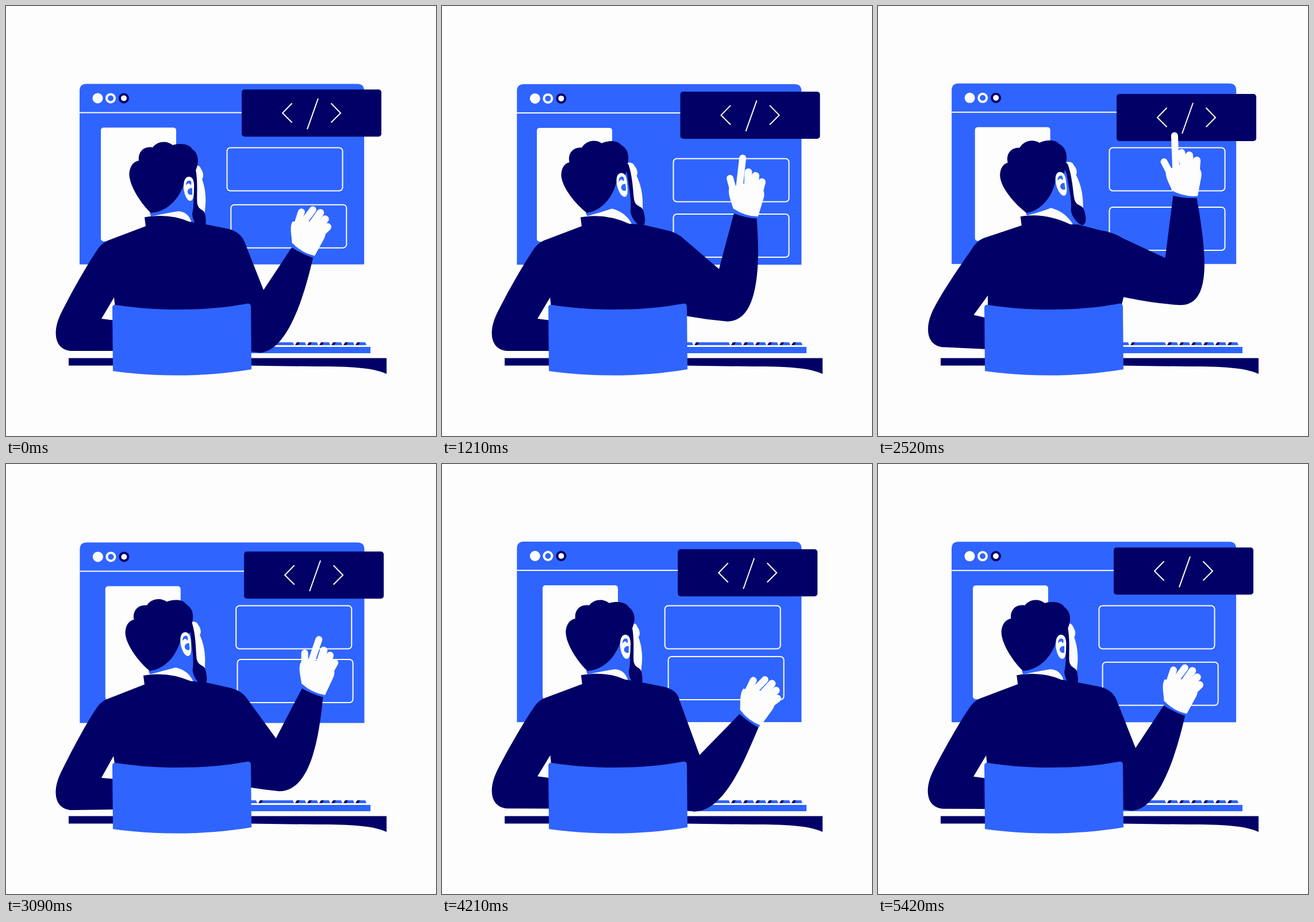
Write an HTML page that moves like this. It is 748 by 748 pixels and loops after 5.45 s.

```html
<!DOCTYPE html>
<html lang="en">
<head>
<meta charset="utf-8">
<title>Developer at work</title>
<style>
html, body { margin: 0; width: 100%; height: 100%; overflow: hidden; background: #fdfdfd; }
svg { display: block; width: 100vw; height: 100vh; }
.b { fill: #2f64ff; }
.d { fill: #000066; }
.w { fill: #fdfdfd; }
.line { fill: none; stroke: #fdfdfd; stroke-width: 2; }
.finger { stroke: #fdfdfd; stroke-linecap: round; }
</style>
</head>
<body>
<svg viewBox="0 0 748 748">
  <g id="win">
    <path class="b" d="M128 449V147Q128 135 140 135H611Q623 135 623 147V449Z"/>
    <path class="line" d="M128 185H623"/>
    <circle class="w" cx="159.5" cy="160" r="9"/>
    <circle class="w" cx="182" cy="160" r="9"/><circle class="b" cx="182" cy="160" r="5"/>
    <circle class="d" cx="205" cy="160" r="9"/><circle class="w" cx="205" cy="160" r="5"/>
  </g>
  <rect id="card" class="w" width="131" height="198" rx="5"/>
  <rect id="box1" class="line" width="201" height="75" rx="6"/>
  <rect id="box2" class="line" width="201" height="75" rx="6"/>
  <g id="badge">
    <rect class="d" width="243" height="82" rx="5"/>
    <path class="line" d="M87.5 24L71 41L87.5 57.5M133 15.5L114 69M155.5 24L172 41L155.5 57.5"/>
  </g>

  <path class="b" d="M400 593H634V604H400Z"/>
  <g id="keys"></g>
  <path class="d" d="M109 612.5H662V640C638 629 600 627 540 627L420 625.5H109Z"/>

  <g id="head">
    <path class="b" d="M250 360L300 330L312 296H330L334 392H262Z"/>
    <g id="face">
      <path class="w" d="M324 277C334 276 338 279 339 283C344 290 344 298 341 301C346 315 348 330 347 345L345 366L332 356Z"/>
      <path class="d" d="M318 270L329 280C335 305 331 335 333 345C336 357 346 352 347 366C349 380 347 388 341 389C334 388 324 374 324 361C328 345 326 325 325 297Z"/>
    </g>
    <path class="d" d="M252 360C236 345 213 312 214.5 290C216 277 223 270 231 269C229 254 240 243 255 246C264 234 281 234 290 242C304 238 319 240 324 249C336 257 336 273 330 286L326 300L310 308C303 332 283 358 252 360Z"/>
    <path class="w" d="M318 297C326 297 328 307 327 318C327 330 326 338 321 339C314 339 309 325 309 313C309 304 312 297 318 297Z"/>
    <path class="b" d="M313 312C313 305 317 302 321 304C323 306 323 310 321 312C319 307 316 308 313 312ZM324 317V328C319 330 315 326 316 321C318 317 321 316 324 317Z"/>
  </g>
  <path id="collar" class="w"/>
  <path id="cuff" class="b"/>
  <path id="suit" class="d"/>
  <g id="hand">
    <path class="w" d="M-23 -9C-28 -20 -38 -33 -36 -44L-29 -46L-18 -55L18 -55Q27 -48 26 -37L22 -3Q0 1 -23 -9Z"/>
    <g id="fingers"></g>
  </g>
  <path class="b" d="M185 525Q185 519 191 520C260 531 350 531 418 518Q426 516 426 524L427 632C350 645 265 646 186 635Z"/>
</svg>
<script>
const LOOP = 5450;
const $ = id => document.getElementById(id);

// Arm joints: at rest, while pointing, and the shift when reaching out
const arm = {
  shoulder: [[416, 413], [430, 403], [-4, -4]],
  crook: [[448, 494], [511, 426], [0, 15]],
  wristL: [[497, 420], [517, 310], [25, 18]],
  wristR: [[534, 438], [559, 311], [20, 25]],
  outer: [[520, 500], [584, 420], [5, 25]],
  elbow: [[490, 603], [600, 502], [0, 2]],
  low: [[440, 603], [545, 502], [-2, 2]],
  pit: [[415, 602], [430, 485], [0, 0]]
};

// Fingers: base, relaxed tip, pointing tip, width
const fingers = [
  [[-26, -35], [-28, -65], [-41, -58], 12],
  [[-19, -46], [-11, -76], [-26, -106], 12],
  [[-4, -46], [3, -76], [-12, -76], 13],
  [[7, -44], [15, -69], [2, -73], 13],
  [[16, -40], [24, -58], [16, -65], 13]
];
$('fingers').innerHTML = fingers.map(([base, , , w]) =>
  `<line class="finger" x1="${base[0]}" y1="${base[1]}" stroke-width="${w}"/>`).join('');
const lines = [...$('fingers').children];

const key = (x, w) =>
  `<path class="b" d="M${x} 590L${x + 3} 585H${x + w - 2}L${x + w} 590Z"/>` +
  `<path class="d" d="M${x} 590L${x + 3} 585H${x + 8}L${x + 5} 590Z"/>`;
$('keys').innerHTML = key(418, 19) + key(439, 62) +
  [0, 1, 2, 3, 4, 5].map(i => key(503 + 21 * i, 19)).join('');

const mix = (a, b, u) => a + (b - a) * u;
function ease(t, from, to) {
  const u = Math.min(1, Math.max(0, (t - from) / (to - from)));
  return u * u * (3 - 2 * u);
}
// Eases from 0 to 1 and later back to 0, across the end of the loop too
function pulse(t, rise, top, fall, end) {
  const s = rise + ((t - rise) % LOOP + LOOP) % LOOP;
  return s < fall ? ease(s, rise, top) : 1 - ease(s, fall, end);
}

const move = (id, value) => $(id).setAttribute('transform', value);
const place = (id, x, y) => move(id, `translate(${x} ${y})`);
const shape = (id, d) => $(id).setAttribute('d', d);

function draw(t) {
  const angle = 4 * Math.PI * t / LOOP, sway = Math.sin(angle);
  const bob = .4 + 1.4 * sway;
  place('win', 1.2 - 1.2 * Math.cos(angle), bob);
  place('card', 165 + 10 * pulse(t, 1700, 3700, 4400, LOOP), 211 + bob);
  place('box1', 384.5 + 18 * pulse(t, 0, 700, 2600, 4800), 246.5 + 19 * pulse(t, 0, 670, 1700, 2520));
  place('box2', 384.5 + 18 * pulse(t, -500, 700, 3760, 4670), 335 + 27 * pulse(t, -600, 800, 1500, 3700));
  place('badge', 410 + 5 * pulse(t, 0, 1500, 2600, 4400), 145.3 + 7.7 * pulse(t, 0, 2520, 2520, LOOP));

  const lift = pulse(t, 670, 1700, 2060, 3760);
  const reach = pulse(t, 2520, 3760, 3760, LOOP);
  const aim = Math.sin(lift * Math.PI / 2);
  const lean = 12 * lift ** 4 - 3 * sway;
  const turn = 22 * (1 - lift) + 9 * reach;

  move('head', `translate(${lean} 0) rotate(${-8 * aim} 252 360)`);
  place('face', 5 * aim, 5 * aim);

  const a = {};
  for (const joint in arm) {
    const [rest, point, out] = arm[joint];
    a[joint] = [0, 1].map(i => mix(rest[i], point[i], lift) + out[i] * reach);
  }

  // Parts of the back follow the lean by different amounts
  const follow = (kx, ky) => (x, y) => [x + kx * lean, y - ky * lean];
  const neck = follow(1, .2), left = follow(.9, .6), rest = follow(.06, .95), gap = follow(.45, .5);
  const tip = [322 + 10 * aim + lean, 374 + 5 * aim];

  shape('collar', `M${neck(243, 368)}Q${[275 + lean, 361 - 2 * aim]} ${[300 + lean - 6 * aim, 357 - 6 * aim]}
    Q${[316 + lean + 3 * aim, 358]} ${tip}L${tip[0]} 392L${neck(250, 385)}Z`);

  const mid = [0, 1].map(i => (a.wristL[i] + a.wristR[i]) / 2);
  shape('suit', `M${neck(241, 367.5)}Q${neck(284, 360)} ${[tip[0] - 4, tip[1] + 1]}
    L348 380L386 ${387.5 + 3 * lift}Q409 393 ${a.shoulder}L${a.crook}L${a.wristL}
    Q${[mid[0], mid[1] + 3]} ${a.wristR}C${a.outer} ${a.elbow} ${a.low}
    Q${[(a.low[0] + a.pit[0]) / 2, a.low[1] - 3]} ${a.pit}
    L420 535H191L${gap(188, 507)}L${rest(166, 544)}L${gap(190, 547)}
    L${[190, 600 - .45 * lean]}L${rest(116, 600)}C${rest(86, 600)} ${rest(79, 570)} ${rest(95, 536)}
    C${rest(110, 505)} ${left(143, 447)} ${left(157, 427)}Q${left(165, 413)} ${left(177, 408)}
    L${neck(243, 383)}Z`);

  const rad = turn * Math.PI / 180, c = Math.cos(rad), s = Math.sin(rad);
  const onHand = (x, y) => [mid[0] + x * c - y * s, mid[1] + x * s + y * c];
  shape('cuff', `M${a.wristL}L${onHand(-22, -10)}L${onHand(21, -8)}L${a.wristR}L${onHand(0, 5)}Z`);
  move('hand', `translate(${mid}) rotate(${turn})`);

  lines.forEach((line, i) => {
    const [, open, point] = fingers[i];
    line.setAttribute('x2', mix(open[0], point[0], aim));
    line.setAttribute('y2', mix(open[1], point[1], aim));
  });
}

const start = performance.now();
function tick() {
  draw((performance.now() - start) % LOOP);
  requestAnimationFrame(tick);
}
tick();
</script>
</body>
</html>
```
